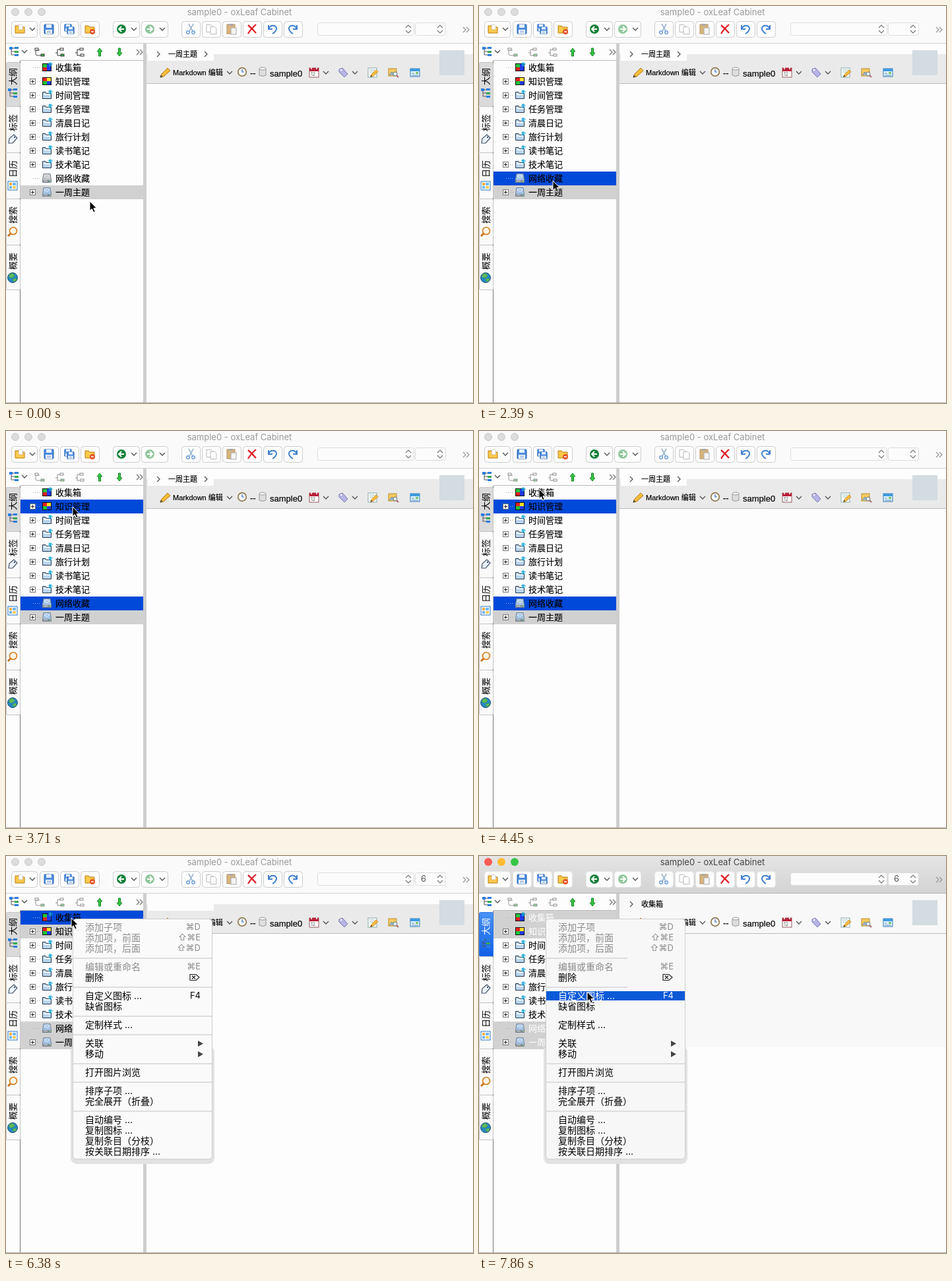
Animation, 708 px wide and 602 px high, one loop 8 s. Source, as an HTML page:

```html
<!DOCTYPE html>
<html lang="zh">
<meta charset="utf-8">
<title>Outline editor</title>
<style>
html,body{margin:0;width:100%;height:100%;overflow:hidden;background:#fdfdfd}
svg{display:block;width:708px;height:602px;font-family:Inter,"Noto Sans CJK SC","DejaVu Sans",sans-serif}
</style>
<body>
<svg id="stage" viewBox="0 0 708 602"></svg>
<script>
const LOOP = 8000;
const BLUE = '#0049d9', GRAY = '#d1d1d1';

// Cursor steps: time, x, y
const cursorSteps = [
  [0, 127, 296], [740, 126, 293], [890, 122, 283], [1040, 118, 274], [1190, 115, 267],
  [1340, 113, 264], [1940, 112, 265], [2980, 130, 137], [3130, 127, 128], [3280, 120, 121],
  [3410, 112, 118], [3560, 105, 116], [3710, 101, 115], [4010, 99, 111], [4160, 96, 103],
  [4310, 93, 93], [4450, 91, 88], [5190, 119, 93], [5340, 112, 94], [5490, 104, 94],
  [5630, 99, 94], [6970, 119, 97], [7110, 140, 101], [7260, 147, 114], [7410, 154, 135],
  [7560, 159, 158], [7710, 163, 181], [7860, 164, 206]
];
const changes = [...cursorSteps.map(s => s[0]), 2390, 4750, 6380, 6520].sort((a, b) => a - b);

const rect = (x, y, w, h, fill, more = '') =>
  `<rect x="${x}" y="${y}" width="${w}" height="${h}" fill="${fill}" ${more}/>`;
const path = (d, stroke, width = 1, fill = 'none') =>
  `<path d="${d}" stroke="${stroke}" stroke-width="${width}" fill="${fill}"/>`;
const disc = (x, y, r, fill, more = '') => `<circle cx="${x}" cy="${y}" r="${r}" fill="${fill}" ${more}/>`;
const at = (x, y, body) => `<g transform="translate(${x} ${y})">${body}</g>`;
const text = (x, y, str, size = 13, fill = '#000', more = '') =>
  `<text x="${x}" y="${y}" font-size="${size}" fill="${fill}" ${more}>${str}</text>`;
const arial = 'font-family="Liberation Sans,Noto Sans CJK SC,sans-serif" stroke="#000" stroke-width=".2"';
const down = (x, y) => path(`M${x - 4} ${y - 2}l4 4 4-4`, '#555', 1.4);
const right = (x, y) => path(`M${x - 2} ${y - 4}l4 4-4 4`, '#555', 1.3);
const more = (x, y, color) => path(`M${x - 4} ${y - 4}l4 4-4 4m5-8l4 4-4 4`, color, 1.3);

// Icons are drawn around their own centre
const pencil = path('M-7 7l2-5L4-7l4 4L-2 6z', '#b87413', 1, '#f7bd3b') + path('M-7 7l1-3 2 2z', '#333', 1);
const sheet = path('M-5-7H3l3 3V7H-5z', '#a8a8a8', 1, '#fff');
const folder = path('M-7 6V-5H-2L0-3H7V6z', '#b87a10', 1, '#ffc94a');
const floppy = (s = 1) => `<g transform="scale(${s})">` + rect(-7, -7, 14, 14, '#4c8ce0', 'rx="1" stroke="#245fae"')
  + rect(-4, -7, 8, 5, '#e8f2ff') + rect(-5, 1, 10, 6, '#fff') + path('M-3 3H3M-3 5H3', '#7b9ed0') + '</g>';
const goTo = (dir, fill) => disc(0, 0, 7, fill) + path(`M${-4 * dir} 0H${4 * dir}M0-4L${4 * dir} 0 0 4`, '#fff', 2);
const undo = dir => `<g transform="scale(${dir} 1)">`
  + path('M-6-6V0H0M-6 0C-3-8 7-6 6 0Q5 4 0 7', '#3f7fd0', 2) + '</g>';
const scissors = path('M-3-8L3 3M4-8L-2 3', '#9db6cf', 1.6) + disc(-4, 5, 2.3, 'none', 'stroke="#6fa0dc" stroke-width="1.5"')
  + disc(4, 5, 2.3, 'none', 'stroke="#6fa0dc" stroke-width="1.5"');
const copy = at(-3, -1, `<g transform="scale(.8)">${sheet}</g>`) + at(3, 2, `<g transform="scale(.8)">${sheet}</g>`);
const paste = rect(-7, -7, 12, 14, '#d9b47c', 'stroke="#ae8e60"') + rect(-4, -8, 6, 3, '#aaa') + rect(-1, -2, 8, 10, '#f5f5f5', 'stroke="#aaa"');
const cross = path('M-6-6Q0-1 6 6M6-7Q-2 0-6 7', '#e0202b', 2.3);
const branch = path('M-6-6V3Q-6 5-3 5H2M-6-3H0', '#444') + rect(-7, -6, 5, 3, '#fff', 'stroke="#333"');
const treeIcon = path('M-4-5V5H2M-4 0H2M-4-5H2', '#555') + rect(-7, -7, 5, 4, '#2a7de0')
  + rect(1, -7, 6, 3, '#2a7de0') + rect(1, -1, 6, 3, '#35a853') + rect(1, 4, 6, 3, '#2a7de0');
const star = path('M5-8V-1M2-5H9M3-7L7-2M7-7L3-2', '#12a7d8', 1.1);
const colors = (a, b, c, d) => rect(-7, -6, 14, 12, '#111') + rect(-6, -5, 6, 5, a) + rect(0, -5, 6, 5, b)
  + rect(-6, 0, 6, 5, c) + rect(0, 0, 6, 5, d);
const blueFolder = path('M-6.5 5.5V-4.5H-2L-1-2.5H6.5V5.5z', '#24364d', 1, '#b9d5ee') + path('M-5-1H6', '#f3f9ff', 2) + star;
const drive = tint => path('M-5-6.5H5L6.5 2V6.5H-6.5V2z', '#7d8894', 1, tint) + rect(-6, 3, 12, 3, '#7f8993')
  + path('M-4-3Q0-7 4-3Q1 1-4-3', '#eef4fa', 1) + path('M-5 4.5H1', '#ddd') + rect(4, 4, 2, 1, '#8f8');
const clock = disc(0, 0, 6.3, '#f4f8ff', 'stroke="#91794e" stroke-width="1.7"') + path('M0-4V0H3', '#3b6cb5', 1.2);
const cylinder = path('M-5-5V5Q0 8 5 5V-5', '#999', 1, '#dedede') + '<ellipse cy="-5" rx="5" ry="2" fill="#f7f7f7" stroke="#999"/>';
const calendar = rect(-7, -7, 14, 14, '#fff', 'stroke="#9b5960"') + rect(-7, -7, 14, 5, '#b9203a')
  + path('M-4-8V-5M4-8V-5', '#fff', 1.5) + text(-5, 5, '12', 7, '#555');
const tag = path('M-6-5L-1-7 7 2 2 7-6-1z', '#7a76b8', 1, '#b7b4e6') + disc(-3, -4, 1.3, '#fff');
const notePencil = rect(-7, -7, 13, 14, '#fff', 'stroke="#8aa"') + path('M-5-4H3M-5-1H1', '#9bb') + `<g transform="translate(2 1) scale(.75)">${pencil}</g>`;
const picture = rect(-7, -6, 12, 11, '#f7c960', 'stroke="#bd8d2c"') + path('M-6 4l4-5 3 3 2-2 2 4', '#689', 1, '#9bc')
  + disc(3, 2, 3, '#e9f4ff', 'stroke="#678"') + path('M5 4L8 7', '#a66', 2);
const windowIcon = rect(-7, -6, 14, 12, '#e9f5ff', 'stroke="#2c79b8"') + rect(-7, -6, 14, 4, '#3f9ade')
  + path('M-5 1H-1M-5 4H5', '#58a', 1) + rect(1, -1, 4, 3, '#76c36b');
const label = path('M-6 6L-5-1 2-7 7-2 0 6z', '#456', 1.2, '#eaf4ff') + disc(3, -3, 1.2, '#456');
const planner = rect(-7, -6, 14, 13, '#fff', 'stroke="#2779c4"') + rect(-5, -4, 4, 4, '#ffaf38') + rect(0, -4, 5, 4, '#72b8f1')
  + rect(-5, 1, 4, 4, '#72b8f1') + rect(0, 1, 5, 4, '#ffcf60');
const lens = disc(1, -1, 5.5, '#fff6e8', 'stroke="#d57b1b" stroke-width="1.6"') + path('M-3 3L-7 7', '#ca741d', 3);
const globe = disc(0, 0, 7.5, '#2587c6', 'stroke="#1d526f"') + path('M-5-4Q0-9 3-3Q-1 2-5-1zM0 3Q5-1 6 3Q2 8 0 3', '#49a853', 1, '#62ba55');
const arrow = dir => `<g transform="scale(1 ${dir})">` + path('M0-6L4-1H1.5V6H-1.5V-1H-4z', '#118526', 1, '#38c742') + '</g>';

const rows = ['收集箱', '知识管理', '时间管理', '任务管理', '清晨日记', '旅行计划', '读书笔记', '技术笔记', '网络收藏', '一周主题'];
const tabs = [['大纲', treeIcon], ['标签', label], ['日历', planner], ['搜索', lens], ['概要', globe]];

// Centre line, label, shortcut, disabled
const menuItems = [
  [108, '添加子项', '⌘D', 1], [124, '添加项，前面', '⇧⌘E', 1], [140, '添加项，后面', '⇧⌘D', 1],
  [168, '编辑或重命名', '⌘E', 1], [184, '删除', '⌦'], [212, '自定义图标 ...', 'F4'], [228, '缺省图标'],
  [256, '定制样式 ...'], [284, '关联', '▶'], [300, '移动', '▶'], [328, '打开图片浏览'],
  [356, '排序子项 ...'], [372, '完全展开（折叠）'], [400, '自动编号 ...'], [416, '复制图标 ...'],
  [432, '复制条目（分枝）'], [448, '按关联日期排序 ...']
];

function toolbar(s) {
  const lights = s.active ? ['#fc5b57', '#fdbc2f', '#35c649'] : Array(3).fill('#dcdcdc');
  const button = ([x, w, cx, icon, chevron]) =>
    rect(x + .5, 23.5, w, 24, '#fdfdfd', `rx="4" stroke="${s.active ? '#e6e6e6' : '#cdcdcd'}"`)
    + at(cx, 35, icon) + (chevron ? down(chevron, 35) : '');
  const buttons = [
    [8, 39, 21, folder + at(1, -3, '<g transform="scale(.55)">' + sheet + '</g>'), 40], [51, 28, 65, floppy()],
    [82, 28, 96, at(-2, -2, floppy(.75)) + at(2, 2, floppy(.75))],
    [113, 28, 127, folder + disc(4, 4, 4, '#e65328') + path('M2 4H6', '#fff', 1.5)],
    [162, 40, 175, goTo(-1, '#16803a'), 194], [205, 40, 218, goTo(1, '#8fc79b'), 237],
    [266, 28, 280, scissors], [297, 28, 311, copy], [328, 28, 342, paste],
    [359, 28, 373, cross], [390, 28, 404, undo(1)], [421, 28, 435, undo(-1)]
  ];
  const spin = x => path(`M${x - 4} 33l4-4 4 4M${x - 4} 37l4 4 4-4`, '#777', 1.2);
  return rect(0, 0, 708, 56, s.active ? 'url(#bar)' : '#fafafa') + rect(0, 56, 708, 1, s.active ? '#b5b5b5' : '#d0d0d0')
    + lights.map((c, i) => disc(14 + 20 * i, 9, s.active ? 6 : 5.5, c, s.active ? '' : 'stroke="#c9c9c9"')).join('')
    + text(354, 14, 'sample0 - oxLeaf Cabinet', 13, s.active ? '#444' : '#9a9a9a', 'text-anchor="middle"')
    + buttons.map(button).join('')
    + rect(472.5, 25.5, 146, 19, '#fcfcfc', 'rx="3" stroke="#dcdcdc"') + rect(620.5, 25.5, 46, 19, '#fcfcfc', 'rx="3" stroke="#dcdcdc"')
    + spin(610) + spin(658) + more(697, 36, '#999') + (s.menu ? text(629, 39, '6', 13, '#555') : '');
}

function header(s) {
  const crumb = s.active ? '收集箱' : s.menu ? '' : '一周主题';
  const back = s.active
    ? rect(213, 57, 495, 233, '#f8f8f8')
    : rect(213, 73, 495, 44, '#eaeaea') + rect(215, 65, 100, 18, '#fdfdfd');
  return rect(213, 57, 495, 545, '#fdfdfd') + back + rect(213, 117, 495, 1, '#bcbcbc')
    + (crumb ? right(231, 73) + text(246, 77, crumb, 11, '#000', 'stroke="#000" stroke-width=".2"') : '')
    + (crumb.length > 3 ? right(303, 73) : '')
    + at(241, 101, pencil) + text(253, 105, 'Markdown 编辑', 11, '#000', arial) + down(339, 101)
    + at(358, 100, clock) + text(370, 106, '--', 13, '#000', arial) + at(389, 100, cylinder)
    + text(400, 107, 'sample0', 13, '#000', arial) + at(467, 101, calendar) + down(485, 101)
    + at(511, 101, tag) + down(529, 101) + at(556, 101, notePencil) + at(587, 101, picture) + at(620, 101, windowIcon)
    + rect(657, 67, 38, 38, '#d3dce0');
}

function sidebar(s) {
  const row = (name, i) => {
    const y = 93 + 21 * i, fill = s.rowFill[i];
    const icon = i === 0 ? colors('#20c83c', '#2038e8', '#e02020', '#2038e8') + star
      : i === 1 ? colors('#e92020', '#ffe029', '#19c638', '#2038e8')
      : i < 8 ? blueFolder : drive(fill ? '#a4c3e6' : '#c4c4c4');
    const box = i && i !== 8
      ? rect(36.5, y - 3.5, 8, 8, '#fff', 'stroke="#777"') + path(`M38 ${y + .5}h5m-2.5-2.5v5`, '#222') : '';
    return (fill ? rect(22, y - 10, 186, 21, fill) : '')
      + `<path d="M41 ${y + .5}h12" stroke="${fill === BLUE ? '#9db8f0' : '#aaa'}" stroke-dasharray="1 2"/>`
      + box + at(62, y, icon) + text(75, y + 5, name, 13, s.active && fill ? '#fff' : '#000',
        s.active && fill ? 'font-weight="500"' : 'stroke="#000" stroke-width=".15"');
  };
  const tab = ([name, icon], i) => {
    const y = 82 + 70 * i, on = i === 0;
    return rect(.5, on ? 85.5 : y + .5, 21, on ? 67 : i === 4 ? 68 : 70, on ? s.active ? 'url(#tab)' : '#dadada' : '#fafafa',
        `stroke="${on && s.active ? '#2f78e6' : '#c4c4c4'}" rx="2"`)
      + at(10, y + 50, icon)
      + `<text transform="translate(15 ${y + 25}) rotate(-90)" font-size="13" text-anchor="middle" fill="${on && s.active ? '#fff' : '#000'}">${name}</text>`;
  };
  const faded = s.multi ? 'opacity=".55"' : '';
  return rect(0, 57, 208, 545, '#fdfdfd') + rect(22, 82, 186, 1, '#bbb') + rect(21, 83, 1, 519, '#777')
    + at(12, 69, treeIcon) + down(28, 69)
    + `<g ${faded}>` + [51, 82, 112].map((x, i) => at(x, 70, i
      ? path('M5-4H-4V5H2M-4 1H-7', '#333') + rect(0, -6, 5, 3, '#fff', 'stroke="#333"') + rect(1, 3, 5, 3, i === 1 ? '#3aba4c' : '#fff', 'stroke="#333"')
      : branch + rect(2, 3, 5, 3, '#3aba4c', 'stroke="#333"'))).join('') + '</g>'
    + at(142, 70, arrow(1)) + at(172, 70, arrow(-1)) + more(202, 70, '#777')
    + tabs.map(tab).join('') + rows.map(row).join('') + rect(208, 57, 5, 545, '#cecece');
}

function menu(s) {
  const line = y => {
    const width = !s.active || y > 290 ? 210 : s.redrawn && y < 200 ? 123 : 0;
    return rect(102, y - 1, width, 2, '#dedede');
  };
  const item = ([y, name, key, off]) => {
    const hot = !off && s.active && Math.abs(s.y - y + .5) < 8 && s.x > 102;
    const color = hot ? '#fff' : off ? '#8b8b8b' : '#000';
    const side = key === '▶' ? path(`M291 ${y - 4}v9l8-4.5z`, 'none', 0, '#444')
      : key === '⌦' ? path(`M279 ${y - 4.5}h9l5 4.5-5 4.5h-9zM282 ${y - 2.5}l5 5m0-5l-5 5`, '#222', 1.2)
      : key ? text(295, y + 4, key, 13, color, 'text-anchor="end"') : '';
    return (hot ? rect(102, y - 7, 210, 14, '#0b5ad7') : '') + text(120, y + 5, name, 14, color) + side;
  };
  return rect(98, 288, 218, 179, '#e2e2e2', 'rx="9"')
    + rect(101.5, 95.5, 211, 364, s.active ? '#f7f7f7' : '#fafafa', 'rx="5" stroke="#cecece"')
    + [155, 199, 243, 271, 315, 343, 387].map(line).join('') + menuItems.map(item).join('');
}

function stateAt(t) {
  const [, x, y] = cursorSteps.findLast(step => step[0] <= t);
  const s = { x, y, multi: t >= 2390, menu: t >= 6380, active: t >= 6520, redrawn: t >= 7410, rowFill: {} };
  const picked = s.menu ? GRAY : BLUE;
  s.rowFill[9] = GRAY;
  if (s.multi) s.rowFill[8] = picked;
  if (t >= 3710) s.rowFill[1] = picked;
  if (t >= 4750) s.rowFill[0] = t < 7260 ? BLUE : GRAY;
  return s;
}

const defs = `<defs><linearGradient id="bar" x2="0" y2="1"><stop stop-color="#e5e5e5"/><stop offset="1" stop-color="#d3d3d3"/></linearGradient>
<linearGradient id="tab" x2="0" y2="1"><stop stop-color="#4a93f6"/><stop offset="1" stop-color="#0f5fe8"/></linearGradient></defs>`;
const stage = document.getElementById('stage');
let shown;

function frame(now) {
  const t = now % LOOP, step = changes.findLast(c => c <= t);
  if (step !== shown) {
    const s = stateAt(t);
    stage.innerHTML = defs + header(s) + sidebar(s) + toolbar(s) + rect(0, 601, 708, 1, '#b0b0b0')
      + (s.menu ? menu(s) : '')
      + at(s.x, s.y, path('M0 0V14.5L3.3 11.5 5.7 17 8.2 16 5.9 10.6H10.3z', '#fff', 1, '#000'));
    shown = step;
  }
  requestAnimationFrame(frame);
}
frame(0);
</script>
</body>
</html>
```
